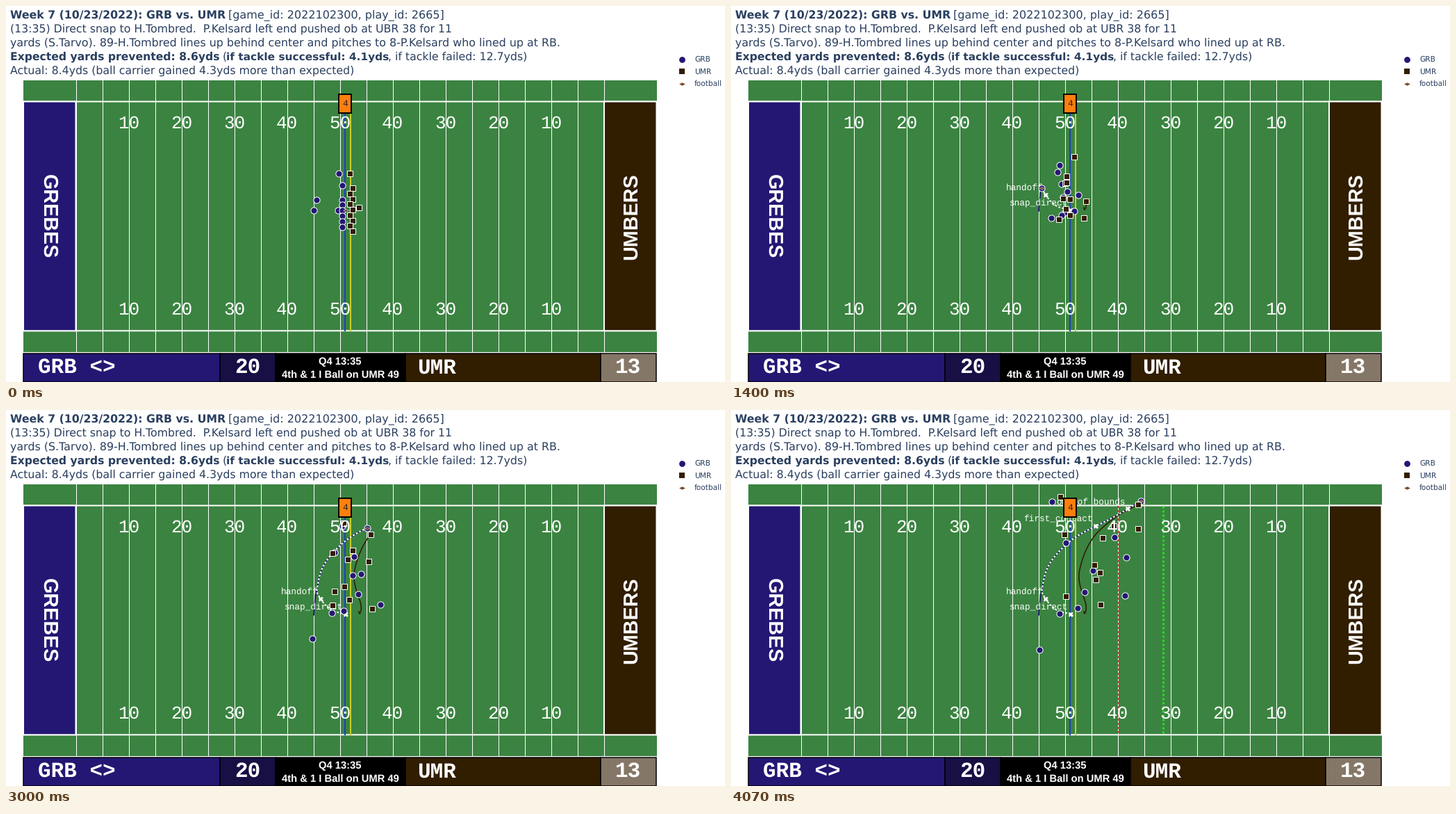
Animation of 1035x541 px, one loop 4140 ms. Source, as a matplotlib script:

```python
import matplotlib.pyplot as plt
import numpy as np
from matplotlib.animation import FuncAnimation
from matplotlib.patches import Rectangle

W, H = 1035, 541
LOOP_MS, FRAME_MS = 4140, 30
STEP_MS, STEPS = 1000 / 15, 62
plt.rcParams["text.hinting"] = "none"

INK, GREEN = "#2a3f5f", "#3b8341"
PURPLE, BROWN, BALL = "#241773", "#311d00", "#7a4a2b"
SANS, ARIAL, MONO = "DejaVu Sans", "Liberation Sans", "Liberation Mono"
HOME, AWAY = "GRB", "UMR"
TOP, BOTTOM = 137.5, 467.3

# At 72 dpi one point is one pixel.
fig = plt.figure(figsize=(W / 72, H / 72), dpi=72, facecolor="white")
ax = fig.add_axes([0, 0, 1, 1])
ax.set_xlim(0, W)
ax.set_ylim(H, 0)
ax.axis("off")


def text(x, y, s, size, color="white", font=MONO, **kw):
    return ax.text(x, y, s, fontsize=size, color=color, family=font, **kw)


def box(x0, y0, x1, y1, fill, edge="none", lw=0.0, z=1.0, **kw):
    ax.add_patch(Rectangle((x0, y0), x1 - x0, y1 - y0, facecolor=fill,
                           edgecolor=edge, linewidth=lw, zorder=z, **kw))


def line(xs, ys, color, lw, z=2.0, **kw):
    return ax.plot(xs, ys, color=color, lw=lw, zorder=z, **kw)[0]


def marks(shape, size, fill, mew=1.0, z=5.0, xs=(), ys=()):
    return ax.plot(xs, ys, ls="none", marker=shape, ms=size, mfc=fill,
                   mec="white", mew=mew, zorder=z)[0]


def yard_x(yards):
    return 24.5 + 7.6 * yards


def track(keys, points):
    """Smooth path through points at the given steps, one row per step."""
    t, p = np.array(keys, float), np.array(points, float)
    slope = np.gradient(p, t, axis=0)
    slope[0] = 0
    f = np.clip(np.arange(STEPS), t[0], t[-1])
    i = np.clip(np.searchsorted(t, f, "right") - 1, 0, len(t) - 2)
    h = (t[i + 1] - t[i])[:, None]
    u = (f - t[i])[:, None] / h
    return ((1 + 2 * u) * (1 - u) ** 2 * p[i] + u * (1 - u) ** 2 * h * slope[i]
            + u * u * (3 - 2 * u) * p[i + 1] + u * u * (u - 1) * h * slope[i + 1])


# Headline
def headline(x, row, s, size=15.7, bold=False):
    text(x, 17.7 + 20 * row, s, size, INK, SANS,
         weight="bold" if bold else "normal")


headline(6, 0, f"Week 7 (10/23/2022): {HOME} vs. {AWAY}", bold=True)
headline(320.5, 0, "[game_id: 2022102300, play_id: 2665]", 16)
headline(6, 1, "(13:35) Direct snap to H.Tombred.  P.Kelsard left end "
               "pushed ob at UBR 38 for 11", 15.8)
headline(6, 2, "yards (S.Tarvo). 89-H.Tombred lines up behind center and "
               "pitches to 8-P.Kelsard who lined up at RB.", 15.9)
headline(6, 3, "Expected yards prevented: 8.6yds", 15.6, bold=True)
headline(312, 3, "(")
headline(317, 3, "if tackle successful: 4.1yds", 15.4, bold=True)
headline(550, 3, ", if tackle failed: 12.7yds)")
headline(6, 4, "Actual: 8.4yds (ball carrier gained 4.3yds more than expected)")

# Legend
DIAMOND = [(-1, 0), (0, 0.5), (1, 0), (0, -0.5), (-1, 0)]
legend = [("o", PURPLE, HOME), ("s", BROWN, AWAY), (DIAMOND, BALL, "football")]
for row, (shape, fill, name) in enumerate(legend):
    y = 76.5 + 17.5 * row
    marks(shape, 8.8, fill, mew=0, xs=[973], ys=[y])
    text(991, y + 3.8, name, 10.6, INK, SANS)

# Field
box(yard_x(0), 107, yard_x(120), 498, GREEN)
for yards in range(10, 111, 5):
    line([yard_x(yards)] * 2, [107, 498], "white", 1, z=1.1)
for y in (TOP, BOTTOM):
    line([yard_x(0), yard_x(120)], [y, y], "white", 2, z=1.2, snap=False)
end_zones = [(0, PURPLE, 52.7, 270, "GREBES"), (110, BROWN, 907.5, 90, "UMBERS")]
for yards, fill, x, angle, name in end_zones:
    box(yard_x(yards) + 0.5, TOP, yard_x(yards + 10), BOTTOM, fill, "white", 2,
        z=1.5, snap=False)
    text(x, 302.5, name, 28.8, font=ARIAL, weight="bold", ha="center",
         rotation=angle, rotation_mode="anchor", zorder=10)
for yards in range(20, 101, 10):
    label = str(50 - abs(60 - yards))
    for y in (175.8, 443.8):
        text(yard_x(yards), y, label, 26, ha="center", zorder=10)
for yards, color in [(61, "#1f3fbf"), (62, "#c9cf22")]:
    line([yard_x(yards)] * 2, [TOP, BOTTOM], color, 2)
box(479, 127, 497, 153.5, "#ff7f0e", "black", 2, z=11)
text(488, 144.5, "4", 13, "#222222", ha="center", zorder=12)

# Scoreboard
panels = [(25, 307.5, PURPLE), (307.5, 387.5, "#180f45"), (387.5, 574.5, "black"),
          (574.5, 855.5, BROWN), (855.5, 936, "#857767")]
for x0, x1, fill in panels:
    box(x0, 499.5, x1, 541, fill, "black", 1.5)
for x, s, align in [(46, f"{HOME} <>", "left"), (347.5, "20", "center"),
                    (592, AWAY, "left"), (895.5, "13", "center")]:
    text(x, 528.5, s, 31, weight="bold", ha=align)
for y, s in [(516.5, "Q4 13:35"), (535.5, f"4th & 1 I Ball on {AWAY} 49")]:
    text(481, y, s, 14.7, font=ARIAL, weight="bold", ha="center")

# Line-ups: the blocking line and the defensive front are evenly spaced.
offense = [(478.5, 241), (483.5, 258), (447, 278.5), (478, 294)]
offense += [(483.7, 278.5 + 7.9 * i) for i in range(6)]
defense = [(495, 241)]
defense += [(497 + 2 * (-1) ** i, 262 + 7.75 * i) for i in range(9)]

# Where each player turns upfield and where he ends.
offense_runs = [
    ((471, 210), (482, 191)), ((529, 283), (567, 267)), ((489, 181), (462, 132)),
    ((442, 323), (444, 345)), ((487, 221), (552, 183)), ((493, 242), (521, 231)),
    ((494, 245), (569, 212)), ((483, 290), (499, 285)), ((468, 292), (473, 293)),
    ((506, 268), (509, 262)),
]
defense_runs = [
    ((489, 176), (474, 125)), ((469, 215), (480, 179)), ((481, 226), (535, 184)),
    ((485, 214), (551, 167)), ((475, 260), (531, 234)), ((468, 285), (482, 268)),
    ((504, 234), (586, 171)), ((486, 282), (525, 244)), ((525, 289), (532, 280)),
    ((460, 274), (523, 223)),
]

SNAP, HANDOFF, CATCH, TURN, CONTACT, OUT, LAST = 6, 19, 21, 39, 46, 56, STEPS - 1


def squad(starts, runs, star):
    paths = [track([2, TURN, LAST], (start, *run))
             for start, run in zip(starts, runs)]
    return np.stack(paths + [star])


# The carrier waits, takes the pitch and sweeps to the sideline with the ball.
sweep_keys = [CATCH, 29, TURN, 51, LAST]
sweep = [(447, 261.5), (456, 226), (489, 188), (551, 154), (590, 131)]
carrier = track([0, 9] + sweep_keys, [(443, 294), (443, 293.5)] + sweep)
ball = track([SNAP, 9, 15, HANDOFF] + sweep_keys,
             [(489, 294), (486, 293), (466, 286), (453, 272)] + sweep)
ball[CATCH:] = carrier[CATCH:]
tackler = track([0, 9, 21, 34, 45, 51, LAST],
                [(508, 290), (509, 293), (511, 281), (501.5, 232), (525, 179),
                 (551, 156), (586, 136)])

home_xy = squad(offense, offense_runs, carrier)
away_xy = squad(defense, defense_runs, tackler)

# Moving parts
trails = [
    (line([], [], PURPLE, 1.6, z=3), carrier),
    (line([], [], BROWN, 1.6, z=3), tackler),
    (line([], [], "white", 2, z=3.1, ls=(0, (1.3, 1.3)), dash_capstyle="butt"), ball),
]
home_dots = marks("o", 9.2, PURPLE, z=5)
away_dots = marks("s", 8.8, BROWN, z=6)
ball_dot = marks(DIAMOND, 8, BALL, mew=0.4, z=5.5)

events = []
for start, name in [(SNAP, "snap_direct"), (HANDOFF, "handoff"),
                    (CONTACT, "first_contact"), (OUT, "out_of_bounds")]:
    x, y = ball[start]
    cross = marks("X", 7, "white", mew=0, z=4, xs=[x], ys=[y])
    label = text(x - 4, y - 7, name, 12.7, ha="right", zorder=4)
    events += [(start, cross), (start, label)]
for yards, color, lw in [(70, "#e0302a", 2), (78.57, "#1fef1f", 2.6)]:
    limit = line([yard_x(yards)] * 2, [TOP, BOTTOM], color, lw, z=2.2,
                 ls=(0, (3 / lw, 3 / lw)), dash_capstyle="butt")
    events.append((CONTACT, limit))


def draw(frame):
    # The play runs at 15 steps a second, read late in each frame.
    step = min(LAST, int((frame + 0.75) * FRAME_MS / STEP_MS))
    for artist, path in trails:
        artist.set_data(*path[:step + 1].T)
    home_dots.set_data(*home_xy[:, step].T)
    away_dots.set_data(*away_xy[:, step].T)
    ball_dot.set_data(*ball[step:step + 1].T)
    for start, artist in events:
        artist.set_visible(step >= start)
    return []


anim = FuncAnimation(fig, draw, frames=LOOP_MS // FRAME_MS, interval=FRAME_MS,
                     repeat=True, repeat_delay=0, blit=False)
plt.show()
```
